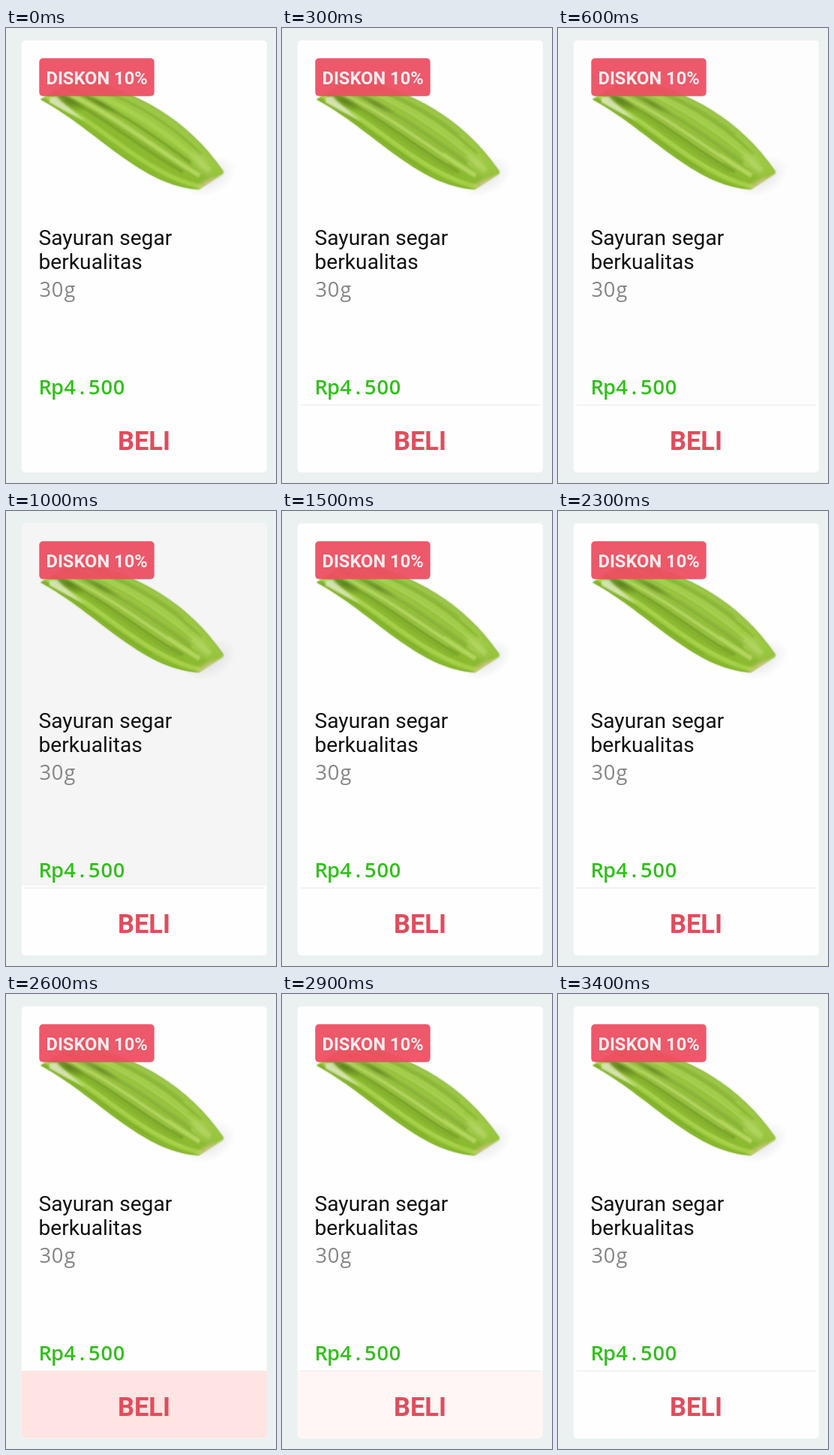
An HTML page with a canvas that plays this animation: 360 by 606 pixels, repeating every 3.5 s.

```html
<!DOCTYPE html>
<html lang="id">
<head>
<meta charset="utf-8">
<title>Kartu produk</title>
<style>
html, body { margin: 0; width: 100%; height: 100%; overflow: hidden; background: #ebf1f1; }
canvas { display: block; width: 360px; height: 606px; }
</style>
</head>
<body>
<canvas id="stage"></canvas>
<script>
const W = 360, H = 606, LOOP = 3500, STEP = 100;
const canvas = document.getElementById('stage');
const dpr = window.devicePixelRatio || 1;
canvas.width = W * dpr;
canvas.height = H * dpr;
const ctx = canvas.getContext('2d');

const TOP = [[96, 64], [178, 88], [240, 119], [290, 191]];
const LOW = [[46, 95], [122, 136], [180, 210], [257, 215]];

const clamp = v => Math.max(0, Math.min(1, v));
const ramp = (t, a, b) => clamp((t - a) / (b - a));
const pulse = (t, a, b, c, d) => ramp(t, a, b) * (1 - ramp(t, c, d));

function box(x, y, w, h, r, color) {
  ctx.fillStyle = color;
  ctx.beginPath();
  ctx.roundRect(x, y, w, h, r);
  ctx.fill();
}

function text(str, x, y, font, color, align = 'left') {
  ctx.font = font;
  ctx.fillStyle = color;
  ctx.textAlign = align;
  ctx.fillText(str, x, y);
}

// Fixed-pitch line: every glyph is centred in its own cell.
function mono(str, x, y, weight, color) {
  const pitch = 16.4;
  [...str].forEach((ch, i) =>
    text(ch, x + pitch * (i + 0.5), y, `${weight} 27.3px "Open Sans", sans-serif`, color, 'center'));
}

// Lengthwise fibre between the lower (0) and upper (1) edge.
const rib = f => LOW.map((p, i) => p.map((v, k) => v + (TOP[i][k] - v) * f));

function split(p, t) {
  const mix = (a, b) => a.map((v, k) => v + (b[k] - v) * t);
  const a = mix(p[0], p[1]), b = mix(p[1], p[2]), c = mix(p[2], p[3]);
  const d = mix(a, b), e = mix(b, c);
  return [p[0], a, d, mix(d, e)];
}

function fibre(f, width, color, end = 1) {
  const p = split(rib(f), end);
  ctx.beginPath();
  ctx.moveTo(...p[0]);
  ctx.bezierCurveTo(...p[1], ...p[2], ...p[3]);
  ctx.strokeStyle = color;
  ctx.lineWidth = width;
  ctx.stroke();
}

function outline() {
  ctx.beginPath();
  ctx.moveTo(...LOW[0]);
  ctx.bezierCurveTo(...LOW[1], ...LOW[2], ...LOW[3]);
  ctx.quadraticCurveTo(272, 205, 290, 194);
  ctx.lineTo(...TOP[3]);
  ctx.bezierCurveTo(...TOP[2], ...TOP[1], ...TOP[0]);
  ctx.closePath();
}

function blob(x, y, rx, ry, angle, color, fade) {
  ctx.save();
  ctx.translate(x, y);
  ctx.rotate(angle);
  ctx.scale(rx, ry);
  const g = ctx.createRadialGradient(0, 0, 0, 0, 0, 1);
  g.addColorStop(0, color);
  g.addColorStop(1, fade);
  ctx.fillStyle = g;
  ctx.fillRect(-1, -1, 2, 2);
  ctx.restore();
}

function celery(detail) {
  blob(272, 198, 38, 24, -0.5, 'rgba(130,130,130,.2)', 'rgba(130,130,130,0)');
  ctx.save();
  ctx.filter = `blur(${0.9 * dpr}px)`;
  outline();
  const g = ctx.createLinearGradient(204, 105, 160, 178);
  g.addColorStop(0, '#9cc64a');
  g.addColorStop(0.3, '#9cc940');
  g.addColorStop(0.6, '#8cbb32');
  g.addColorStop(1, '#8aba2f');
  ctx.fillStyle = g;
  ctx.fill();
  outline();
  ctx.clip();

  fibre(0, 4, '#84b32c');
  fibre(0.14, 6, '#a3cf45');
  fibre(0.33, 4, '#7ba32b', 0.84);
  fibre(0.45, 6, '#b3d55f', 0.93);
  fibre(0.58, 3.5, '#7ca32e', 0.84);
  fibre(0.72, 7, '#a6d04e', 0.95);
  fibre(0.86, 2.5, '#86b136', 0.85);
  fibre(1, 3, '#8fbc43');
  ctx.globalAlpha = detail * 0.5;
  for (let i = 0; i < 9; i++) {
    fibre(0.06 + i * 0.105, 1.3, i % 2 ? '#c3e07c' : '#6c9228', 0.7 + (i * 7 % 4) * 0.06);
  }
  ctx.globalAlpha = 1;

  // Pale gap and shade among the stems below the badge.
  ctx.beginPath();
  ctx.moveTo(58, 93);
  ctx.lineTo(68, 91);
  ctx.quadraticCurveTo(84, 108, 106, 124);
  ctx.quadraticCurveTo(82, 113, 58, 99);
  ctx.fillStyle = '#d3e3ab';
  ctx.fill();
  blob(84, 98, 24, 8, 0.5, 'rgba(80,110,25,.7)', 'rgba(80,110,25,0)');
  blob(126, 101, 30, 5, 0.5, 'rgba(85,115,30,.6)', 'rgba(85,115,30,0)');

  blob(260, 180, 26, 12, 0.85, 'rgba(182,213,105,.8)', 'rgba(182,213,105,0)');
  blob(270, 207, 24, 8, -0.48, 'rgba(219,194,142,.95)', 'rgba(215,205,140,0)');
  ctx.restore();
}

function draw(t) {
  ctx.setTransform(dpr, 0, 0, dpr, 0, 0);
  const settled = ramp(t, 0, 300);
  const cardTap = pulse(t, 500, 900, 1000, 1300);
  const buyTap = pulse(t, 2300, 2500, 2700, 3000);

  ctx.fillStyle = '#ebf1f1';
  ctx.fillRect(0, 0, W, H);
  box(20.8, 16.5, 327, 575.5, 5, '#fefefe');
  if (cardTap) box(20.8, 16.5, 327, 482.5, [5, 5, 0, 0], `rgba(245,245,245,${cardTap})`);

  ctx.fillStyle = `rgba(233,236,238,${settled})`;
  ctx.fillRect(25, 501.5, 319, 1.2);
  if (buyTap) box(20.8, 502, 327, 89.5, [0, 0, 5, 5], `rgba(254,228,226,${buyTap})`);

  celery(settled);
  box(44.3, 40.3, 153.4, 50.5, 5, 'rgba(237,80,98,.95)');
  text('DISKON 10%', 53.5, 75, 'bold 23.7px Roboto, sans-serif', '#fbeeee');

  const title = '400 28.2px Roboto, sans-serif';
  text('Sayuran segar', 43.5, 289, title, '#111');
  text('berkualitas', 43.5, 321, title, '#111');
  mono('30g', 44, 358, 400, '#858585');
  mono('Rp4.500', 44, 487.5, 600, '#32bf1c');
  text('BELI', 184, 561.5, 'bold 34.5px Roboto, sans-serif', '#e14c5b', 'center');
}

const start = performance.now();
function tick() {
  const t = (performance.now() - start) % LOOP;
  draw(Math.floor(t / STEP) * STEP);
  requestAnimationFrame(tick);
}
tick();
</script>
</body>
</html>
```
